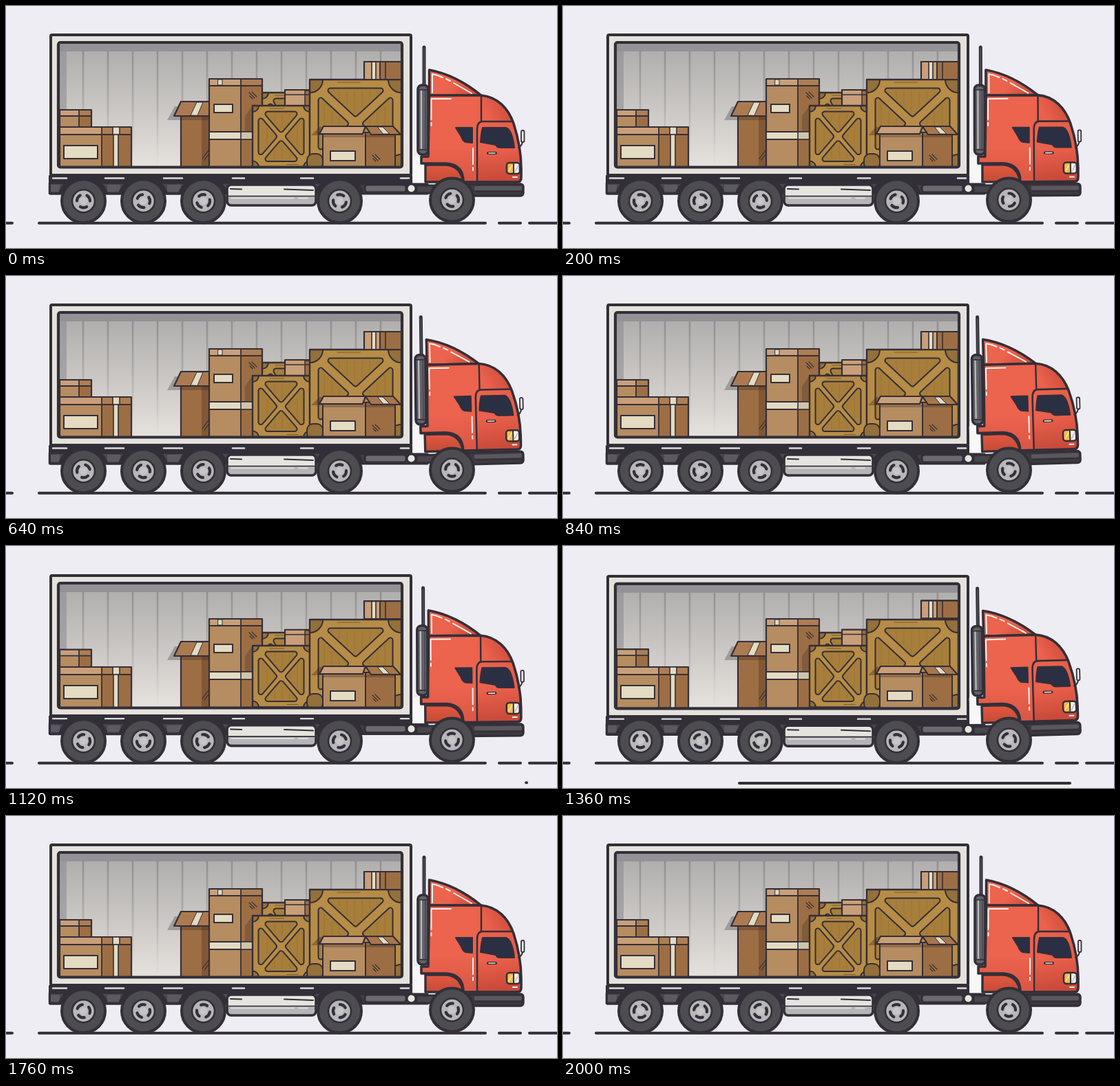
Write an HTML page with a canvas that moves like this. It is 800 px wide and 352 px high and loops after 2040 ms.

```html
<!DOCTYPE html>
<html lang="en">
<head>
<meta charset="utf-8">
<title>Moving truck</title>
<style>
html, body { margin: 0; width: 100%; height: 100%; overflow: hidden; background: #eeedf3; }
canvas { display: block; }
</style>
</head>
<body>
<canvas id="stage" width="800" height="352"></canvas>
<script>
const ctx = document.getElementById('stage').getContext('2d');
const LOOP = 2040;
const INK = '#332f38', CREAM = '#e3dbc2', TAN = '#b68c61', LID = '#c99f79', BROWN = '#9d6e44';
const RED = '#ec634e', GOLD = '#b78c46', PANEL = '#a77e3b', CORNER = '#94703a', STEEL = '#5b5a60';

const TILT = [[0, 0], [840, 1.6], [1140, .4], [1360, 1.6], [1580, 0], [2040, 0]];
const DROP = [[0, 0], [900, 0], [1340, 2], [1560, 0], [2040, 0]];

// Cosine easing between [time, value] keys
function ease(keys, t) {
  let i = 1;
  while (i < keys.length - 1 && t > keys[i][0]) i++;
  const [t0, a] = keys[i - 1], [t1, b] = keys[i];
  return a + (b - a) * (1 - Math.cos(Math.PI * (t - t0) / (t1 - t0))) / 2;
}

function paint(fill, line = 2.2, color = INK) {
  if (fill) { ctx.fillStyle = fill; ctx.fill(); }
  if (line) { ctx.strokeStyle = color; ctx.lineWidth = line; ctx.stroke(); }
}
function rect(x0, y0, x1, y1, fill, line, r = 0) {
  ctx.beginPath();
  ctx.roundRect(x0, y0, x1 - x0, y1 - y0, r);
  paint(fill, line);
}
function poly(pts, fill, line, color) {
  ctx.beginPath();
  for (let i = 0; i < pts.length; i += 2) ctx.lineTo(pts[i], pts[i + 1]);
  ctx.closePath();
  paint(fill, line, color);
}
function seg(x0, y0, x1, y1, w = 2, color = INK) {
  ctx.beginPath();
  ctx.moveTo(x0, y0);
  ctx.lineTo(x1, y1);
  paint(null, w, color);
}
function disc(x, y, r, fill, line) {
  ctx.beginPath();
  ctx.arc(x, y, r, 0, 7);
  paint(fill, line);
}
function shape(d, fill, line = 3.5, color = INK) {
  const p = new Path2D(d);
  if (fill) { ctx.fillStyle = fill; ctx.fill(p); }
  if (line) { ctx.strokeStyle = color; ctx.lineWidth = line; ctx.stroke(p); }
}
function fade(x0, y0, x1, y1, ...colors) {
  const g = ctx.createLinearGradient(x0, y0, x1, y1);
  colors.forEach((c, i) => g.addColorStop(i / (colors.length - 1), c));
  return g;
}
function shifted(dy, draw) {
  ctx.save();
  ctx.translate(0, dy);
  draw();
  ctx.restore();
}
// Leans a part around the hitch
function leaning(angle, dx, dy, draw) {
  ctx.save();
  ctx.translate(588 + dx, 266 + dy);
  ctx.rotate(-angle);
  ctx.translate(-588, -266);
  draw();
  ctx.restore();
}
function scratch(x, y) {
  seg(x, y, x + 8, y + 8, 1.2);
  seg(x + 4, y - 1, x + 11, y + 6, 1.2);
  seg(x + 1, y + 5, x + 5, y + 9, 1.2);
}

// Closed carton: light front up to split, darker side, lid strip on top
function carton(x0, y0, x1, y1, split, lid) {
  rect(x0, y0, split, y1, TAN, 0);
  rect(split, y0, x1, y1, BROWN, 0);
  rect(x0, y0, split, y0 + lid, LID, 0);
  rect(split, y0, x1, y0 + lid, '#ae7d52', 0);
  seg(x0, y0 + lid, x1, y0 + lid, 1.8);
  seg(split, y0, split, y1, 1.8);
  rect(x0, y0, x1, y1, null, 2.2);
}

// m: inset of the panels, g: half gap left for the crossed bars
function crate(x, y, w, h, m, g, corner) {
  const r = x + w, b = y + h, cx = x + w / 2, cy = y + h / 2;
  rect(x, y, r, b, GOLD, 0);
  const panels = [
    [x + m + g, y + m, r - m - g, y + m, cx, cy - g],
    [x + m + g, b - m, r - m - g, b - m, cx, cy + g],
    [x + m, y + m + g, x + m, b - m - g, cx - g, cy],
    [r - m, y + m + g, r - m, b - m - g, cx + g, cy]
  ];
  for (const p of panels) {
    poly(p, null, 9);
    poly(p, PANEL, 5, PANEL);
    ctx.save();
    ctx.clip();
    for (let s = x + 10; s < r; s += 11) seg(s, y, s, b, 1, '#9a7435');
    ctx.restore();
  }
  ctx.save();
  ctx.beginPath();
  ctx.rect(x, y, w, h);
  ctx.clip();
  for (const px of [x, r]) for (const py of [y, b]) disc(px, py, corner, CORNER, 2);
  ctx.restore();
  seg(x + w * .3, y + 4, x + w * .55, y + 4, 1, '#7b5b2b');
  seg(x + w * .6, b - 4, x + w * .8, b - 4, 1, '#7b5b2b');
  rect(x, y, r, b, null, 2.4);
}

function cargo(hop) {
  poly([234, 166, 245, 146, 254, 146, 254, 166], 'rgba(70,68,76,.35)', 0);

  shifted(-hop * .5, () => carton(78, 151, 124, 178, 106, 9));
  carton(78, 176, 182, 237, 139, 11);
  rect(84, 203, 133, 222, CREAM, 2);
  rect(155, 176, 165, 187, CREAM, 1.6);
  rect(156, 187, 163, 237, CREAM, 1.6);

  rect(254, 158, 296, 237, BROWN, 2.2);
  rect(284, 160, 295, 237, 'rgba(60,35,20,.28)', 0);
  rect(255, 160, 295, 166, 'rgba(60,35,20,.3)', 0);
  poly([244, 160, 254, 139, 296, 139, 296, 160], '#ac7a50', 2.2);
  poly([268, 159, 277, 140, 286, 140, 278, 159], CREAM, 1);
  seg(285, 222, 294, 210, 1.2);
  seg(288, 224, 294, 216, 1.2);

  carton(295, 106, 372, 237, 341, 10);
  rect(308, 107, 314, 115, CREAM, 1);
  rect(302, 143, 329, 155, CREAM, 2);
  rect(295, 183, 358, 194, CREAM, 1.8);
  rect(341, 183, 358, 194, '#cfc5aa', 1.6);
  scratch(353, 126);
  poly([347, 160, 358, 145, 358, 182, 347, 182], 'rgba(50,35,30,.25)', 0);

  crate(372, 126, 62, 80, 12, 8, 9);
  shifted(-hop * .3, () => {
    rect(405, 122, 441, 147, LID, 2.2);
    rect(434, 123, 441, 146, BROWN, 1.5);
    seg(405, 129, 441, 129, 1.6);
  });
  crate(358, 145, 83, 89.5, 12, 10, 9);
  crate(441, 107, 133, 128, 16, 14, 19);
  rect(437, 215, 460, 238, CORNER, 2, 9);

  shifted(-hop, () => {
    rect(520, 81, 543, 107, LID, 1.8);
    rect(543, 81, 575, 107, BROWN, 1.8);
    rect(531, 81, 537, 107, CREAM, 1.6);
    seg(551, 82, 551, 106, 1.6);
    rect(520, 81, 575, 107, null, 2.2);
  });

  poly([443, 188, 455, 176, 462, 176, 462, 188], 'rgba(50,35,20,.35)', 0);
  rect(460, 184, 522, 237, TAN, 2);
  rect(522, 184, 565, 237, BROWN, 2);
  rect(461, 187, 564, 191, 'rgba(60,35,20,.3)', 0);
  poly([461, 175, 522, 175, 518, 186, 455, 186], LID, 2.2);
  poly([522, 175, 562, 175, 573, 187, 530, 187], '#a8764b', 2.2);
  poly([539, 176, 547, 176, 557, 186, 548, 186], CREAM, 1);
  rect(471, 211, 507, 225, CREAM, 2);
  scratch(532, 217);
}

function trailer(drop) {
  shifted(drop, () => rect(65, 42, 588, 246, '#e5e2dd', 4, 2));
  ctx.save();
  ctx.beginPath();
  ctx.rect(76, 53 + drop, 499, 181.5);
  ctx.clip();
  rect(76, 53, 575, 238, fade(0, 60, 0, 232, '#afadac', '#c9c6c3', '#e5e2dd'), 0);
  const stripe = fade(0, 60, 0, 225, 'rgba(125,123,128,.65)', 'rgba(145,143,148,.45)', 'rgba(160,158,160,.05)');
  for (let x = 112; x < 575; x += 36) seg(x, 62, x, 228, 2.6, stripe);
  rect(77, 53, 88, 238, fade(0, 60, 0, 232, '#9b999d', '#b1afb1'), 0);
  rect(76, 53, 575, 66 + drop, '#949296', 0);
  cargo(drop * .8);
  ctx.restore();
  shifted(drop, () => rect(76, 53, 575, 234.5, null, 4.2, 3));
}

function chassis() {
  rect(63, 247, 589, 259, INK, 2);
  rect(63.5, 257, 500, 273, '#49474d', 3.5, 1);
  for (const [a, b] of [[65, 78], [147, 166], [234, 254]]) rect(a, 260, b, 270, STEEL, 0);
  for (const [a, b] of [[68, 88], [144, 171], [229, 256], [329, 346], [428, 446], [573, 585]])
    seg(a, 250.5, b, 250.5, 2.4, '#dddbdd');
  rect(500, 259, 612, 273, '#434147', 3);
  rect(521, 260, 581, 271, '#6b6a6f', 3, 4);
  for (const x of [112, 199, 286, 484]) {
    ctx.save();
    ctx.beginPath();
    ctx.arc(x, 284, 38, Math.PI * 1.02, Math.PI * 1.98);
    ctx.clip();
    rect(x - 38, 254, x + 38, 273, INK, 0);
    ctx.restore();
  }

  rect(321, 260, 450, 290, '#b5b4b6', 0, 6);
  rect(321, 260, 450, 276, '#e6e4df', 0, [6, 6, 0, 0]);
  seg(323, 276.5, 448, 276.5, 1.6);
  seg(327, 279.5, 418, 279.5, 2, '#dddcdc');
  seg(425, 279.5, 438, 279.5, 2, '#dddcdc');
  seg(326, 266, 342, 266.5, 2);
  seg(404, 266.5, 446, 268, 2);
  rect(321, 260, 450, 290, null, 3.6, 6);
}

function exhaust() {
  seg(607, 60, 607, 118, 5);
  seg(607, 62, 607, 116, 1.2, '#5d5c62');
  rect(598, 115, 613, 216, '#636268', 3.6, 6);
  seg(603, 123, 603, 207, 2.2, '#bcbbbf');
  seg(609, 122, 609, 210, 2, '#4d4c52');
  seg(600, 122, 611, 122, 1.6);
  seg(600, 209, 611, 209, 1.6);
}

function cab() {
  rect(591, 219, 610, 257, '#f7f7f8', 0);
  rect(596, 261, 690, 272, '#48464c', 3);

  // Wheel fender
  shape('M609 231H640Q660 233 664 256H609Z', fade(0, 231, 0, 258, '#e25841', '#c24a35'), 3.4);

  // Roof deflector and body
  shape('M614.5 93Q653 100 690 130H614.5Z', fade(630, 96, 668, 132, RED, RED, '#cf4f3b'));
  const body = 'M614.5 130H690C713 132 729 148 737 171Q748 205 748 236V250Q748 256 742 256H664Q664 231 640 229H603V219H613Z';
  shape(body, fade(613, 0, 748, 0, RED, RED, '#e65c47'), 0);
  ctx.save();
  ctx.clip(new Path2D(body));
  rect(690, 130, 750, 169, fade(700, 160, 732, 140, 'rgba(160,45,35,0)', 'rgba(160,45,35,.4)'), 0);
  rect(684, 206, 750, 257, fade(0, 208, 0, 256, 'rgba(150,40,32,0)', 'rgba(150,40,32,.42)'), 0);
  rect(600, 200, 682, 257, fade(0, 205, 0, 250, 'rgba(150,40,32,0)', 'rgba(150,40,32,.2)'), 0);
  ctx.restore();
  shape(body, null, 3.6);
  shape('M690 130V167', null, 2.4);
  shape('M684 256V180Q684 168 692 168H736', null, 2.6);

  // Windows
  shape('M653 177H677V199L667 198Q663 196 661 190Z', '#2a2f43', 2);
  shape('M692 177H726Q735 180 738 206H717Q713 206 711 202L689 198Q690 184 692 177Z', '#2a2f43', 2);

  // Highlights and fittings
  shape('M619 126V99Q626 100 634 104M639 106L645 109M650 112L676 127', null, 2, '#fff1ec');
  shape('M617.5 165V135H646M617.5 170V174', null, 2, '#fff1ec');
  shape('M678 207V230M678 235V239', null, 2, '#fff1ec');
  seg(700, 214, 711, 214, 4);
  seg(701, 214, 710, 214, 1.6, '#f4e8e4');
  shape('M750 197Q749 204 744 206', null, 2);
  rect(748, 181, 752.5, 198, '#eeedf0', 1.8, 2);
  rect(727, 228, 746, 244, '#f3f1ec', 0, 4);
  rect(727, 228, 736, 244, '#f4bb46', 0, [4, 0, 0, 4]);
  seg(730, 240, 735, 232, 1.6, '#fae2a4');
  seg(739, 241, 744, 232, 1.4, '#b9b7bb');
  seg(737, 228, 737, 244, 2);
  rect(727, 228, 746, 244, null, 2.5, 4);
  seg(736, 249, 742, 249, 2, '#fff1ec');

  // Bumper
  rect(664, 259, 751, 276, '#3d3a41', 3.4, [2, 4, 4, 2]);
  rect(680, 262, 749, 268, '#5a585e', 0, 2);
  seg(682, 270, 750, 270, 1.8);
}

function wheel(x, y, turn) {
  disc(x, y, 31.5, '#4d4c51', 4);
  disc(x, y, 16.5, '#b7b6b8', 2.6);
  ctx.save();
  ctx.translate(x, y);
  ctx.rotate(turn);
  for (let i = 0; i < 3; i++) {
    ctx.rotate(Math.PI * 2 / 3);
    ctx.beginPath();
    ctx.arc(0, 0, 9.5, -.5, .5);
    paint(null, 4.2);
  }
  ctx.restore();
  disc(x, y, 5.5, '#c6c5c7', 0);
}

function speedLine(t, dy) {
  const end = s => 756 - .008 * Math.max(0, t - s) ** 2;
  const left = end(1111), right = end(1311);
  if (t > 1111 && right > -4) seg(Math.max(left, -6), 343.6 + dy, right, 343.6 + dy, 4);
}

function draw(t) {
  const drop = ease(DROP, t), tilt = ease(TILT, t) * Math.PI / 180;
  ctx.lineCap = ctx.lineJoin = 'round';
  ctx.fillStyle = '#eeedf3';
  ctx.fillRect(0, 0, 800, 352);

  for (const [a, b] of [[-5, 9], [48, 696], [716, 747], [760, 806]]) seg(a, 315.8, b, 315.8, 4);
  speedLine(t, drop * .7);

  shifted(drop * .6, chassis);
  trailer(drop);

  leaning(tilt / 2, -tilt * 90, drop, exhaust);
  leaning(tilt, 0, drop, cab);
  disc(588.5, 265.5 + drop * .6, 6.5, '#e9e7df', 3);

  const turn = t / LOOP * Math.PI * 4 - Math.PI / 6;
  [112, 199, 286, 484].forEach((x, i) => wheel(x + .5, 283.7, turn + i * .4));
  wheel(647.5, 282, turn + .3);
}

const start = performance.now();
function tick() {
  draw((performance.now() - start) % LOOP);
  requestAnimationFrame(tick);
}
tick();
</script>
</body>
</html>
```
